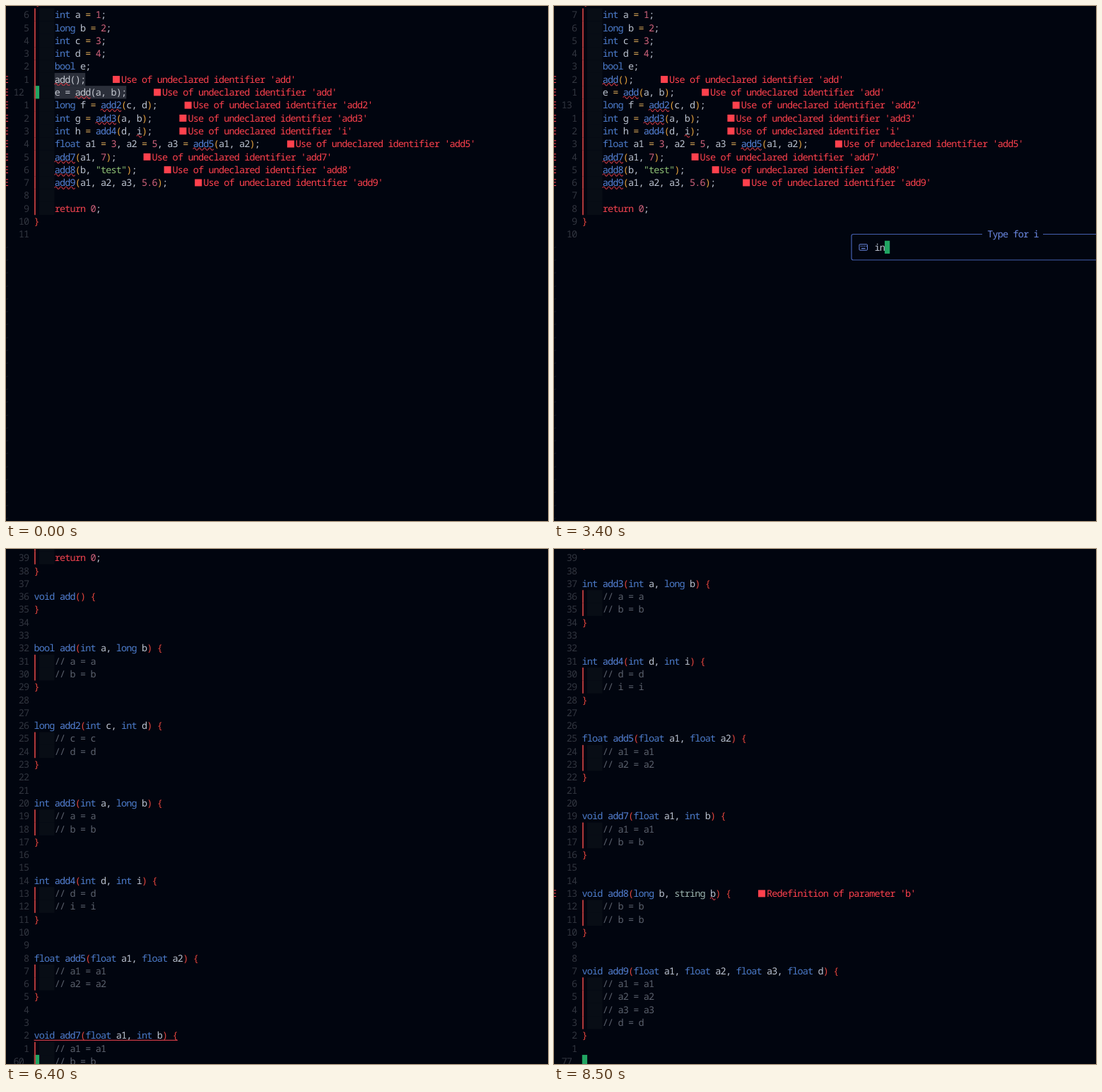
An HTML page for the animation above (8.6 s loop, 767 by 730 pixels).

```html
<!DOCTYPE html>
<html lang="en">
<head>
<meta charset="utf-8">
<title>Editor</title>
<style>
  html, body { margin: 0; width: 100%; height: 100%; overflow: hidden; background: #01050f; }
  svg { display: block; width: 767px; height: 730px; }
  text {
    font: 13.5px "Noto Sans Mono", "DejaVu Sans Mono", monospace;
    letter-spacing: -0.84px;
    white-space: pre;
    text-rendering: geometricPrecision;
  }
</style>
</head>
<body>
<svg id="stage" viewBox="0 0 767 730"></svg>
<script>
const LOOP = 8600;
const CW = 7.26, LH = 18.3, X0 = 39.6, Y0 = 3.35, LAST_ROW = 39;
const C = {
  bg: '#01050f', text: '#bcc3d0', type: '#4d7ccb', func: '#5682d6', num: '#d0637c',
  str: '#8fc277', op: '#d8a657', paren: '#e2a03c', brace: '#e0443c', ret: '#f2434f',
  note: '#5b616d', lib: '#9cb4ae', gutter: '#31353f', error: '#ff414d', wave: '#c73843',
  bar: '#b93a3c', indent: '#080d15', select: '#2b2f3a', cursor: '#21a562',
  frame: '#4560b0', title: '#6c89e2', tilde: '#10151f'
};

// Buffer: the main function, then one generated stub per call.
const lines = ['', '', '', '', 'int main()', '{',
  ...['int a = 1;', 'long b = 2;', 'int c = 3;', 'int d = 4;', 'bool e;', 'add();',
    'e = add(a, b);', 'long f = add2(c, d);', 'int g = add3(a, b);', 'int h = add4(d, i);',
    'float a1 = 3, a2 = 5, a3 = add5(a1, a2);', 'add7(a1, 7);', 'add8(b, "test");',
    'add9(a1, a2, a3, 5.6);', '', 'return 0;'].map(s => '    ' + s),
  '}', ''];
const stubs = [
  'void add()', 'bool add(int a, long b)', 'long add2(int c, int d)', 'int add3(int a, long b)',
  'int add4(int d, int i)', 'float add5(float a1, float a2)', 'void add7(float a1, int b)',
  'void add8(long b, string b)', 'void add9(float a1, float a2, float a3, float d)'
].map(head => {
  const params = [...head.matchAll(/(\w+)[,)]/g)].map(m => m[1]);
  const first = lines.length;
  lines.push(head + ' {', ...params.map(p => `    // ${p} = ${p}`), '}', '', '');
  return { first, close: first + params.length + 1 };
});

const errors = {};
['add', 'add', 'add2', 'add3', 'i', 'add5', 'add7', 'add8', 'add9'].forEach((name, k) => {
  errors[11 + k] = { name, text: `Use of undeclared identifier '${name}'` };
});
errors[stubs[7].first] = { name: 'b', text: "Redefinition of parameter 'b'", from: stubs[7].close + 1 };

const colX = c => X0 + c * CW;
const rowY = r => Y0 + r * LH;
const esc = s => s.replace(/&/g, '&amp;').replace(/</g, '&lt;');
const rect = (x, y, w, h, fill) => `<rect x="${x}" y="${y}" width="${w}" height="${h}" fill="${fill}"/>`;
const label = (col, row, s, fill) =>
  `<text x="${colX(col).toFixed(2)}" y="${(rowY(row) + 13.9).toFixed(2)}" fill="${fill}">${esc(s)}</text>`;
const stroke = (d, color, w) => `<path d="${d}" fill="none" stroke="${color}" stroke-width="${w}"/>`;

function wave(col, row, n) {
  let d = `M${colX(col)} ${rowY(row) + 16.5}`;
  for (let k = 0; k < n * 2; k++) d += `q${CW / 4} ${k % 2 ? 3.4 : -3.4} ${CW / 2} 0`;
  return stroke(d, C.wave, 1.1);
}

function tokenColor(tok, rest, inBody) {
  if (tok.startsWith('//')) return C.note;
  if (tok[0] === '"') return C.str;
  if (/^(int|long|bool|float|void)$/.test(tok)) return C.type;
  if (tok === 'return') return C.ret;
  if (tok === 'string') return C.lib;
  if (/^\d/.test(tok)) return C.num;
  if (/^\w/.test(tok)) return rest[0] === '(' ? C.func : C.text;
  if (tok === '=') return C.op;
  if (/[()]/.test(tok)) return inBody ? C.paren : C.brace;
  if (/[{}]/.test(tok)) return C.brace;
  return C.text;
}

function code(s, row) {
  const inBody = s.startsWith('    ');
  return [...s.matchAll(/\/\/.*|"[^"]*"|[\d.]+|\w+|\S/g)].map(m =>
    label(m.index, row, m[0], tokenColor(m[0], s.slice(m.index + m[0].length), inBody))).join('');
}

function drawLine(n, row, st) {
  const s = lines[n], y = rowY(row), end = colX(s.length);
  const selected = st.visual && n >= 11 && n <= st.cur;
  let out = '';
  if (s.startsWith('    ')) out += rect(47, y, 21.6, LH, C.indent);
  if (selected) out += rect(colX(4), y, end - colX(4), LH, C.select);
  if (n === st.cur && !st.prompt) out += rect(X0 + 0.2, y, CW, LH, C.cursor);
  if (s.startsWith('    ')) out += rect(40, y, 1.9, LH + 0.1, C.bar);

  const num = String(n === st.cur ? n : Math.abs(n - st.cur));
  out += label(n === st.cur ? -4 : -1 - num.length, row, num, C.gutter);
  out += selected ? label(4, row, s.slice(4), '#c4c8d0') : code(s, row);

  const err = errors[n];
  if (err && st.cur >= (err.from || 0)) {
    const tx = s.length + 7;
    out += label(-6, row, 'E', C.error) + wave(s.lastIndexOf(err.name), row, err.name.length) +
      rect(colX(tx) - 12, y + 4.2, 10, 10, C.error) + label(tx, row, err.text, C.error);
  }
  const open = stubs.find(f => f.first === n);
  if (open && st.cur >= n && st.cur < open.close)
    out += stroke(`M${X0} ${y + 15.9}H${end}`, C.wave, 1.2);
  return out;
}

function drawPrompt(typed) {
  const keys = [0, 1, 2, 3].map(k => rect(434 + k * 2.4, 339.8, 1.2, 1.3, C.title)).join('');
  return rect(421, 323.5, 346, 36.5, C.bg) +
    stroke('M606 323.5H423.5Q421 323.5 421 326V357.5Q421 360 423.5 360H767M692 323.5H767', C.frame, 1.2) +
    label(79, 17, 'Type for i', C.title) +
    `<rect x="432" y="337.8" width="11.5" height="8.4" rx="1" fill="none" stroke="${C.title}"/>` +
    keys + rect(435, 343, 5.5, 1.2, C.title) +
    label(57, 18, typed, C.text) +
    rect(colX(57 + typed.length), rowY(18), CW, LH, C.cursor);
}

// Time in ms and the line reached while the stubs are written.
const writing = [[3700, 23], [5550, 51], [6380, 60], [7380, 72], [7800, 77]];

function state(t) {
  if (t < 2200) return { visual: true, cur: 12 + Math.min(7, Math.floor(t / 180)) };
  if (t < 3700) {
    const n = t < 3200 ? 0 : Math.min(3, 1 + Math.floor((t - 3200) / 160));
    return { cur: 13, prompt: true, typed: 'int'.slice(0, n) };
  }
  for (let k = 1; k < writing.length; k++) {
    const [t0, a] = writing[k - 1], [t1, b] = writing[k];
    if (t < t1) return { cur: Math.floor(a + (b - a) * (t - t0) / (t1 - t0)) };
  }
  return { cur: 77 };
}

const stage = document.getElementById('stage');
let shown = '';

function render(t) {
  const st = state(t), key = JSON.stringify(st);
  if (key === shown) return;
  shown = key;
  const top = Math.max(6, st.cur - LAST_ROW), last = Math.max(23, st.cur);
  let out = rect(0, 0, 767, 730, C.bg);
  for (let row = -1; row <= LAST_ROW; row++) {
    const n = top + row;
    out += n <= last ? drawLine(n, row, st) : label(-6, row, '~', C.tilde);
  }
  if (st.prompt) out += drawPrompt(st.typed);
  stage.innerHTML = out;
}

const start = performance.now();
function tick() {
  render((performance.now() - start) % LOOP);
  requestAnimationFrame(tick);
}
tick();
</script>
</body>
</html>
```
